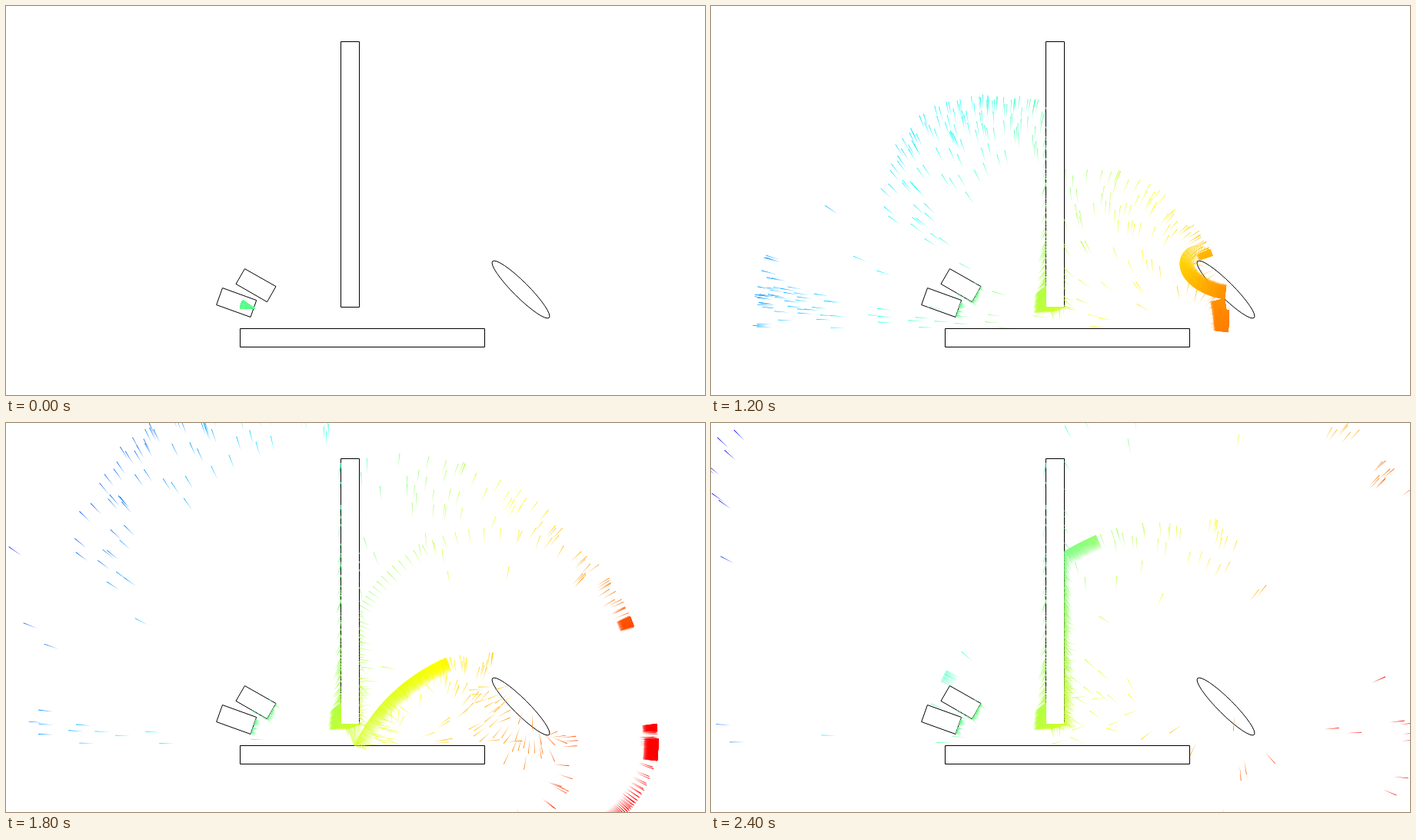
Animation of 909 by 507 pixels, one loop 2500 ms. Source, as an HTML page with a canvas:

```html
<!DOCTYPE html>
<html lang="en">
<head>
<meta charset="utf-8">
<title>Ray pulse</title>
<style>
  html, body { margin: 0; width: 100%; height: 100%; overflow: hidden; background: #fff; }
  canvas { display: block; width: 909px; height: 507px; }
</style>
</head>
<body>
<canvas id="stage" width="909" height="507"></canvas>
<script>
const ctx = document.getElementById('stage').getContext('2d');

const LOOP = 2500, FRAME = 100;
const STEP = 15.92, STEPS_PER_FRAME = 11 / 6;
const REACH = STEP * 45;
const TAIL = 19.5, HALF_WIDTH = 0.45;
const RAYS = 3200, SCATTER = 0.3;
const SOURCE = { x: 323.7, y: 394.5, from: 0.3, to: 36 };

const rect = (l, t, r, b) => [[l, t], [r, t], [r, b], [l, b]];
const solids = [
  { kind: 'mirror', pts: rect(304.5, 420.5, 622.5, 444.5) },
  { kind: 'wall', pts: rect(435.5, 46.5, 459.5, 392.5) },
  { kind: 'box', pts: [[310.5, 342.5], [351, 365.5], [339.5, 385.7], [299, 362.3]] },
  { kind: 'box', pts: [[281.5, 367.5], [325.7, 383.5], [318, 405.5], [273.7, 389.5]] }
];
const lens = { x: 669.5, y: 369.5, a: 52, b: 10, tilt: Math.PI / 4 };

const edges = solids.flatMap(({ kind, pts }) => pts.map((p, i) => {
  const q = pts[(i + 1) % pts.length];
  const ex = q[0] - p[0], ey = q[1] - p[1], len = Math.hypot(ex, ey);
  return { kind, x: p[0], y: p[1], ex, ey, nx: ey / len, ny: -ex / len };
}));

let seed = 20;
function random() {
  seed = (seed + 0x6D2B79F5) | 0;
  let t = Math.imul(seed ^ (seed >>> 15), 1 | seed);
  t = (t + Math.imul(t ^ (t >>> 7), 61 | t)) ^ t;
  return ((t ^ (t >>> 14)) >>> 0) / 4294967296;
}

function hitEdge(e, x, y, dx, dy) {
  const det = dx * e.ey - dy * e.ex;
  if (Math.abs(det) < 1e-9) return Infinity;
  const px = e.x - x, py = e.y - y;
  const along = (px * dy - py * dx) / det;
  const d = (px * e.ey - py * e.ex) / det;
  return along >= 0 && along <= 1 && d > 0.01 ? d : Infinity;
}

const cosT = Math.cos(lens.tilt), sinT = Math.sin(lens.tilt);
const toLens = (x, y) => [(x * cosT + y * sinT) / lens.a, (y * cosT - x * sinT) / lens.b];

function hitLens(x, y, dx, dy) {
  const [px, py] = toLens(x - lens.x, y - lens.y);
  const [vx, vy] = toLens(dx, dy);
  const a = vx * vx + vy * vy, b = px * vx + py * vy, c = px * px + py * py - 1;
  const disc = b * b - a * c;
  if (disc < 0) return Infinity;
  const d = (-b - Math.sqrt(disc)) / a;
  return d > 0.01 ? d : Infinity;
}

function lensNormal(x, y) {
  const [u, v] = toLens(x - lens.x, y - lens.y);
  const gx = u / lens.a, gy = v / lens.b, len = Math.hypot(gx, gy);
  return [(gx * cosT - gy * sinT) / len, (gx * sinT + gy * cosT) / len];
}

// Each leg is a straight run between two path lengths.
const legs = [];

function trace(x, y, dx, dy, start, bounces) {
  if (start > REACH || bounces > 7) return;
  let near = hitLens(x, y, dx, dy), edge = null;
  for (const e of edges) {
    const d = hitEdge(e, x, y, dx, dy);
    if (d < near) { near = d; edge = e; }
  }
  const leg = { x, y, dx, dy, start, end: start + near, stuckTail: 0 };
  legs.push(leg);
  if (leg.end > REACH) return;

  if (edge && edge.kind !== 'mirror') {
    if (edge.kind === 'wall') leg.stuckTail = TAIL * random();
    else if (random() < 0.5) leg.stuckTail = TAIL * random() / 2;
    else leg.end += random() * 42;
    return;
  }
  const hx = x + dx * near, hy = y + dy * near;
  const [nx, ny] = edge ? [edge.nx, edge.ny] : lensNormal(hx, hy);
  const dot = dx * nx + dy * ny;
  trace(hx, hy, dx - 2 * dot * nx, dy - 2 * dot * ny, leg.end, bounces + 1);

  if (edge && random() < SCATTER) {
    const a = Math.PI * random(), side = Math.cos(a), out = Math.sin(a);
    trace(hx, hy, nx * out - ny * side, ny * out + nx * side, leg.end, bounces + 1);
  }
}

for (let i = 0; i < RAYS; i++) {
  const deg = SOURCE.from + (SOURCE.to - SOURCE.from) * i / (RAYS - 1);
  const a = deg * Math.PI / 180;
  trace(SOURCE.x, SOURCE.y, Math.cos(a), Math.sin(a), 0, 0);
}

// Red, yellow, cyan, blue bands laid diagonally over the stage.
function colour(x, y) {
  const v = (1050 - x - y / 2) / 335;
  const level = n => Math.round(255 * Math.max(0, Math.min(1, n)));
  return `rgb(${level(2 - v)},${level(v < 1.5 ? v : 3 - v)},${level(v - 1)})`;
}

function drawSolids() {
  ctx.strokeStyle = '#000';
  ctx.lineWidth = 1;
  for (const { pts } of solids) {
    ctx.beginPath();
    pts.forEach(([x, y]) => ctx.lineTo(x, y));
    ctx.closePath();
    ctx.stroke();
  }
  ctx.beginPath();
  ctx.ellipse(lens.x, lens.y, lens.a, lens.b, lens.tilt, 0, Math.PI * 2);
  ctx.stroke();
}

function drawRay({ x: x0, y: y0, dx, dy }, run, tail) {
  const x = x0 + dx * run, y = y0 + dy * run;
  if (x < -25 || x > 934 || y < -25 || y > 532) return;
  const wx = dy * HALF_WIDTH, wy = dx * HALF_WIDTH;
  ctx.fillStyle = colour(x, y);
  ctx.beginPath();
  ctx.moveTo(x - wx, y + wy);
  ctx.lineTo(x + wx, y - wy);
  ctx.lineTo(x - dx * tail, y - dy * tail);
  ctx.fill();
}

function draw(frame) {
  const dist = STEP * Math.floor(STEPS_PER_FRAME * frame + 1e-6);
  ctx.fillStyle = '#fff';
  ctx.fillRect(0, 0, 909, 507);
  drawSolids();
  for (const leg of legs) {
    if (dist < leg.start) continue;
    if (dist < leg.end) drawRay(leg, dist - leg.start, TAIL);
    else if (leg.stuckTail) drawRay(leg, leg.end - leg.start, leg.stuckTail);
  }
}

let shown = -1;
function tick() {
  const frame = Math.floor(performance.now() % LOOP / FRAME);
  if (frame !== shown) draw(shown = frame);
  requestAnimationFrame(tick);
}
tick();
</script>
</body>
</html>
```
